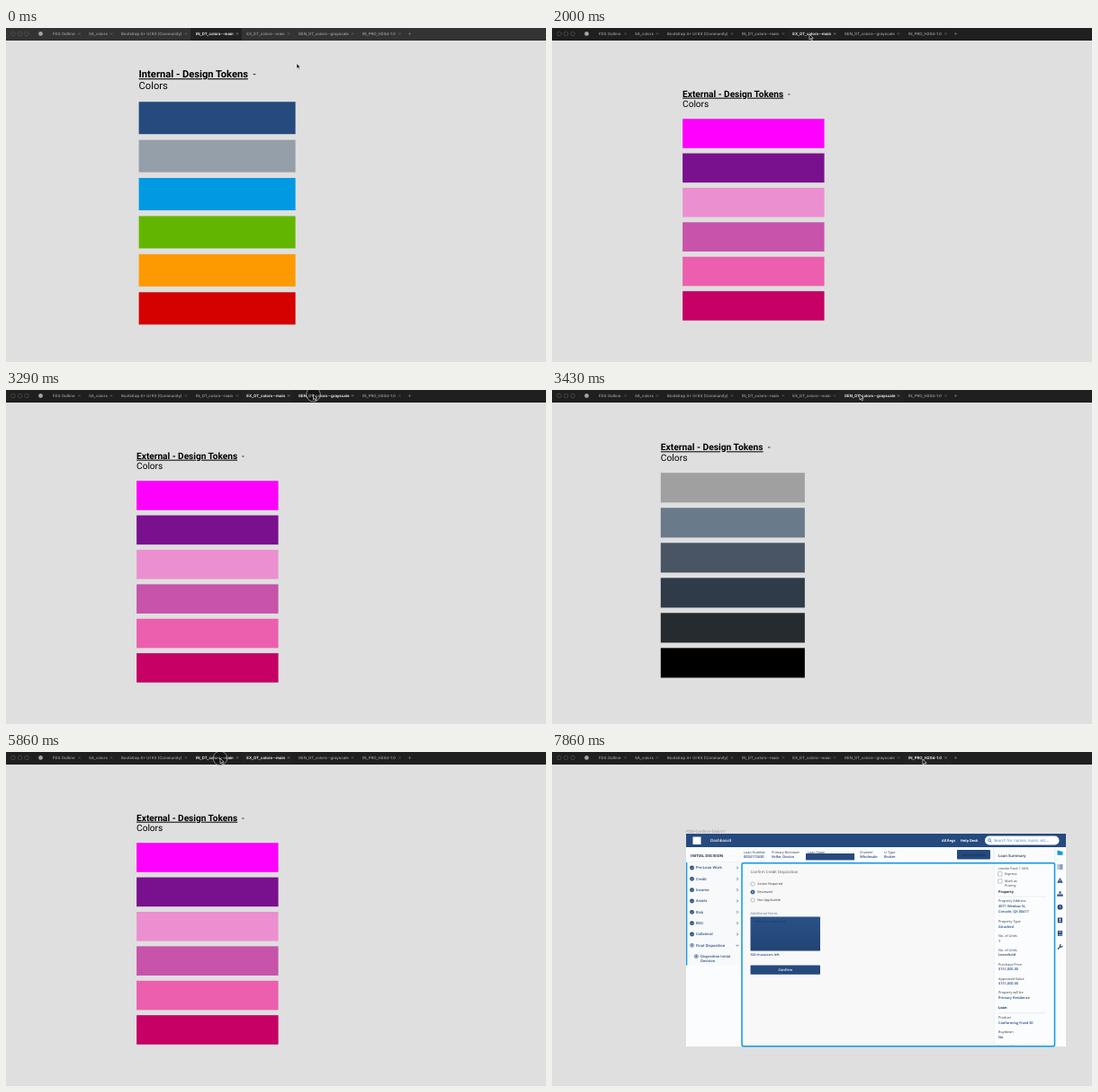
An HTML page for the animation above (8000 ms loop, 600x372 px).

```html
<!DOCTYPE html>
<html lang="en">
<head>
<meta charset="utf-8">
<title>Design tokens</title>
<style>
  html, body { margin: 0; width: 100%; height: 100%; overflow: hidden; background: #dfdfdf; }
  svg { display: block; width: 100vw; height: 100vh; }
  text { white-space: pre; text-rendering: geometricPrecision; }
  .tab { font: 500 4.35px Inter, sans-serif; fill: #a5a5a5; }
  .tab.lit { font-weight: 600; fill: #fff; }
  .title { font: 11.15px Roboto, sans-serif; fill: #000; }
  .title .name { font-weight: 700; text-decoration: underline; }
  .app text { font-family: "Open Sans", sans-serif; }
</style>
</head>
<body>
<svg id="stage" viewBox="0 0 600 372" preserveAspectRatio="none"></svg>
<script>
const stage = document.getElementById('stage');
const NAVY = '#254a7d', BRIGHT = '#0d99e6', INK = '#333d4a';

function add(parent, tag, attrs = {}, content) {
  const el = document.createElementNS('http://www.w3.org/2000/svg', tag);
  for (const key in attrs) el.setAttribute(key, attrs[key]);
  if (content !== undefined) el.textContent = content;
  parent.append(el);
  return el;
}
const rect = (p, x, y, width, height, fill, more) => add(p, 'rect', { x, y, width, height, fill, ...more });
const circle = (p, cx, cy, r, fill, more) => add(p, 'circle', { cx, cy, r, fill, ...more });
const line = (p, d, stroke, width = 0.6, more) =>
  add(p, 'path', { d, stroke, 'stroke-width': width, fill: 'none', ...more });
const label = (p, x, y, str, size = 3.9, fill = INK, weight = 400, more) =>
  add(p, 'text', { x, y, 'font-size': size, fill, 'font-weight': weight, ...more }, str);

rect(stage, 0, 0, 600, 372, '#dfdfdf');

// Colour boards share one layout and differ in place and scale.
function board(name, x, y, scale, colors) {
  const g = add(stage, 'g', { transform: `translate(${x} ${y}) scale(${scale})` });
  const title = add(g, 'text', { class: 'title', x: 0, y: -27 });
  add(title, 'tspan', { class: 'name' }, name + ' - Design Tokens');
  add(title, 'tspan', {}, '\u00a0\u00a0-');
  add(g, 'text', { class: 'title', x: 0, y: -14.2 }, 'Colors');
  colors.forEach((c, i) => rect(g, 0, i * 42.42, 174, 36, c));
  return g;
}

function projectScreen() {
  const g = add(stage, 'g', { class: 'app' });
  label(g, 149, 89.6, 'PDD-Confirm-Task V1', 4.4, '#8f8f8f');
  rect(g, 149, 91, 422, 237, '#fbfcfd');
  header(g);
  summaryRow(g);
  sideNav(g);
  form(g);
  loanDetails(g);
  toolIcons(g);
  rect(g, 211, 123.8, 347.5, 204, 'none', { stroke: BRIGHT, 'stroke-width': 1.5, rx: 1.5 });
  return g;
}

function header(g) {
  rect(g, 149, 91, 422, 15, NAVY);
  rect(g, 156.5, 94.5, 9, 8.5, '#fff');
  label(g, 176, 100.4, 'Dashboard', 4.4, '#fff', 600);
  label(g, 433, 100.4, 'All Regs', 3.9, '#fff', 700);
  label(g, 454, 100.4, 'Help Desk', 3.9, '#fff', 700);
  rect(g, 481, 93.6, 82.5, 9.8, '#fff', { rx: 4.9 });
  circle(g, 486, 98.1, 1.5, 'none', { stroke: '#2f6fb0', 'stroke-width': 0.7 });
  line(g, 'M487 99.2l1.5 1.5', '#2f6fb0', 0.8);
  label(g, 490.7, 100.2, 'Search for names, loans, etc...', 4.45, '#4a7fb5');
}

function summaryRow(g) {
  label(g, 154, 116.6, 'INITIAL DECISION', 4.2, '#263545', 700);
  [['Loan Number', '0004172630', 213], ['Primary Borrower', 'Velke, Dorian', 244],
   ['Loan Stage', '', 284], ['Channel', 'Wholesale', 342], ['LI Type', 'Broker', 369]
  ].forEach(([name, value, x]) => {
    label(g, x, 112.6, name, 3.75);
    label(g, x, 118.4, value, 3.95, NAVY, 600);
  });
  rect(g, 282, 113, 54, 7.4, NAVY);
  rect(g, 450, 109, 37, 10.4, NAVY, { rx: 1 });
  label(g, 468.5, 115.8, 'Start Decision', 3.9, '#16315a', 600, { 'text-anchor': 'middle' });
  label(g, 496, 116.6, 'Loan Summary', 4.2, '#263545', 600);
  line(g, 'M149 123H558M491 106V328', '#d9dfe6', 0.6);
}

function sideNav(g) {
  rect(g, 149, 123, 61.5, 114.5, '#f7f9fa');
  rect(g, 149, 123, 1.3, 114.5, BRIGHT);
  const items = ['Pre-Loan Work', 'Credit', 'Income', 'Assets', 'Risk', 'REO', 'Collateral', 'Final Disposition'];
  items.forEach((name, i) => {
    const y = 129 + i * 12.33, last = i === items.length - 1;
    if (last) {
      openDot(g, 155.5, y);
    } else {
      circle(g, 155.5, y, 2.4, NAVY);
      line(g, `M154.4 ${y}l.8.9l1.5-1.7`, '#fff', 0.5);
    }
    label(g, 160, y + 1.4, name, 4.05, NAVY, 600);
    line(g, last ? `M204.6 ${y - 0.6}l1.4 1.4l1.4-1.4` : `M205.3 ${y - 1.4}l1.4 1.4l-1.4 1.4`, NAVY, 0.7);
  });
  openDot(g, 160.3, 227.6);
  label(g, 165, 229, 'Disposition Initial', 3.95, NAVY, 600);
  label(g, 165, 234.3, 'Decision', 3.95, NAVY, 600);
}

function openDot(g, x, y) {
  circle(g, x, y, 2, '#fff', { stroke: NAVY, 'stroke-width': 0.6 });
  circle(g, x, y, 1, NAVY);
}

function form(g) {
  const shade = add(add(stage, 'defs'), 'linearGradient', { id: 'shade', x2: 0, y2: 1 });
  add(shade, 'stop', { offset: 0, 'stop-color': '#2a5187' });
  add(shade, 'stop', { offset: 1, 'stop-color': '#214472' });
  rect(g, 211, 123.8, 279.7, 204, '#f8f8f8');
  label(g, 220.5, 135.4, 'Confirm Credit Disposition', 4.3, '#4d5661');
  ['Action Required', 'Reviewed', 'Not Applicable'].forEach((name, i) => {
    const y = 147 + i * 9, on = i === 1;
    circle(g, 223, y, 2.1, on ? NAVY : '#fff', { stroke: on ? NAVY : '#8795a5', 'stroke-width': 0.6 });
    if (on) circle(g, 223, y, 0.8, '#fff');
    label(g, 228.3, y + 1.4, name, 3.75);
  });
  label(g, 220.5, 181, 'Additional Notes', 3.9, '#5878a4');
  rect(g, 220.5, 183.5, 77.5, 38, 'url(#shade)', { rx: 0.8 });
  label(g, 224, 190, 'Add your notes here', 3.8, '#1c3a66');
  label(g, 220.5, 227, '500 characters left', 3.6, NAVY, 600);
  rect(g, 220.5, 237.5, 77.5, 10.3, NAVY, { rx: 0.8 });
  label(g, 259.2, 244.2, 'Confirm', 4, '#fff', 600, { 'text-anchor': 'middle' });
}

function loanDetails(g) {
  const clip = add(add(stage, 'defs'), 'clipPath', { id: 'panel' });
  rect(clip, 491, 106, 67, 221.5);
  const p = add(g, 'g', { 'clip-path': 'url(#panel)' });
  label(p, 496, 130.5, 'Lender Paid: 1.50%', 3.75);
  for (const y of [133.8, 141.8]) rect(p, 495.8, y, 4.2, 4.2, '#fff', { stroke: '#8795a5', 'stroke-width': 0.5 });
  label(p, 503, 137.3, 'Express', 3.75);
  label(p, 503, 145.3, 'Mark as', 3.75);
  label(p, 503, 150, 'Priority', 3.75);
  label(p, 496, 156.6, 'Property', 3.9, '#263545', 700);
  label(p, 496, 286.4, 'Loan', 3.9, '#263545', 700);
  line(p, 'M496 161H549M496 290.8H549', '#d3dae2', 0.5);
  [[167.4, 'Property Address', '4071 Wenlow St,', 'Corvale, QX 00417'],
   [190, 'Property Type', 'Attached'], [206.2, 'No. of Units', '1'], [221.8, 'No. of Units', 'Leasehold'],
   [237.6, 'Purchase Price', '$151,000.00'], [253.5, 'Appraised Value', '$151,000.00'],
   [269.3, 'Property will be', 'Primary Residence'], [297.4, 'Product', 'Conforming Fixed 30'],
   [313.2, 'Buydown', 'No'], [329.2, 'Impounds']
  ].forEach(([y, name, ...values]) => {
    label(p, 496, y, name, 3.8);
    values.forEach((v, i) => label(p, 496, y + 5.6 * (i + 1), v, 3.9, NAVY, 600));
  });
}

function toolIcons(g) {
  line(g, 'M558.8 106V328', '#d9dfe6', 0.6);
  const icon = (y, d, fill = NAVY) => add(g, 'path', { d, fill, transform: `translate(564.5 ${y})` });
  const stroke = (y, d, color, width) => line(g, d, color, width, { transform: `translate(564.5 ${y})` });
  icon(112.3, 'M-3-2.5h2.5l1 1H3V2.5H-3z', BRIGHT);
  stroke(128, 'M-3-2H-1.8M-3 0H-1.8M-3 2H-1.8M-1-2H3M-1 0H3M-1 2H3', NAVY, 1);
  icon(143, 'M0-3L3.2 2.7H-3.2z');
  stroke(143, 'M0-1V1M0 1.5v.6', '#fff', 0.6);
  icon(158, 'M-1-2.8h2v2h-2zM-3.2.8h2v2h-2zM-1 .8h2v2h-2zM1.2.8h2v2h-2z');
  stroke(158, 'M0-1V1M-2.2 1V0H2.2V1', NAVY, 0.5);
  circle(g, 564.5, 172.7, 2.9, NAVY);
  stroke(172.7, 'M0-1.8V0L1.2.9', '#fff', 0.6);
  icon(187.4, 'M-2.6-2.9h5.2v5.8h-5.2z');
  circle(g, 564.5, 186.5, 0.9, '#fff');
  icon(187.4, 'M-1.5 1.7q1.5-2.2 3 0z', '#fff');
  icon(202, 'M-2.6-2.9h5.2v5.8h-5.2z');
  stroke(202, 'M-1.4-1.3H1.6M-1.6 1.7H2.6', '#fff', 0.6);
  stroke(217, 'M-2.6 2.6L1 -1', NAVY, 1.3);
  stroke(217, 'M1-2.8A1.5 1.5 0 1 0 2.8-1', NAVY, 1.1);
}

const pages = {
  internal: board('Internal', 147.6, 82.2, 1,
    ['#254a7d', '#959fa9', '#0099e2', '#63b600', '#fe9a01', '#d50000']),
  external: board('External', 145.1, 101.2, 0.905,
    ['#ff00ff', '#79108e', '#ec8fd0', '#c753ab', '#ec5fae', '#c60064']),
  grayscale: board('External', 120.8, 92.2, 0.92,
    ['#a0a0a0', '#697a8b', '#495565', '#2f3b48', '#252b2e', '#000']),
  project: projectScreen()
};

// Tab bar: text, text start, left edge, close mark, page opened by the tab.
const BAR_HEIGHT = 14;
const bar = rect(stage, 0, 0, 600, BAR_HEIGHT, '#1f1f1f');
const activeBack = rect(stage, 0, 0, 0, BAR_HEIGHT, '#222');
for (const x of [8, 15.5, 23]) circle(stage, x, 6.4, 2.3, 'none', { stroke: '#5c5c5c', 'stroke-width': 0.6 });
circle(stage, 38.5, 6.4, 2.4, '#a5a5a5');
const tabs = [
  ['FDS Outline', 52, 46, 81.5], ['SA_colors', 92, 86, 117],
  ['Bootstrap 4+ UI Kit (Community)', 128, 122, 200],
  ['IN_DT_colors--main', 211, 205, 257, 'internal'],
  ['EX_DT_colors--main', 267.3, 262, 314, 'external'],
  ['GEN_DT_colors--grayscale', 324.8, 318.5, 385, 'grayscale'],
  ['IN_PRO_H20d-1.0', 396, 390, 437.5, 'project']
].map(([name, x, left, close, page], i, all) => ({
  left, page,
  right: all[i + 1] ? all[i + 1][2] : 443,
  text: add(stage, 'text', { class: 'tab', x, y: 8 }, name),
  close: line(stage, `M${close - 1.1} 5.3l2.2 2.2m0-2.2l-2.2 2.2`, '#777', 0.5)
}));
line(stage, 'M446.9 6.4h3.2M448.5 4.8v3.2', '#888', 0.5);

const ring = circle(stage, 0, 0, 7.8, '#000', { 'fill-opacity': 0.3, stroke: '#b4b4b4', 'stroke-width': 0.7 });
const pointer = add(stage, 'path', {
  d: 'M0 0V5.9L1.4 4.6L2.4 6.8L3.4 6.3L2.4 4.2H4.2Z',
  fill: '#000', stroke: '#fff', 'stroke-width': 0.6, 'stroke-linejoin': 'round'
});

const LOOP = 8000, RATE = 7 / 1000, FOCUS = 2;
const path = [
  [0, 323, 39.5], [8, 297, 9], [9, 297, 9], [11, 285, 7], [14, 286, 7], [16, 286, 7],
  [22, 341, 5], [24, 342, 5], [26, 342, 5], [29, 328, 5], [30, 328, 5], [35, 292, 8],
  [38, 290, 7], [41, 238, 7], [42, 238, 7], [45, 316.5, 6.5], [47, 316.5, 6.5],
  [48, 317.5, 6.5], [53, 411, 8], [55, 412, 8]
];
const shows = [[0, 'internal'], [13, 'external'], [24, 'grayscale'], [36, 'external'], [42, 'internal'], [54, 'project']];
const clicks = [12, 23, 35, 41];

function pointerAt(step) {
  const next = path.findIndex(k => k[0] >= step);
  if (next === 0) return path[0].slice(1);
  const [t0, x0, y0] = path[next - 1], [t1, x1, y1] = path[next];
  const u = (step - t0) / (t1 - t0), e = u * u * (3 - 2 * u);
  return [x0 + (x1 - x0) * e, y0 + (y1 - y0) * e];
}

function draw(time) {
  const step = Math.min(55, Math.floor((time % LOOP + 2) * RATE));
  const [x, y] = pointerAt(step);
  const current = shows.filter(s => s[0] <= step).pop()[1];
  for (const name in pages) pages[name].style.display = name === current ? '' : 'none';
  bar.setAttribute('fill', step < FOCUS ? '#333' : '#1f1f1f');
  for (const tab of tabs) {
    const active = tab.page === current;
    const lit = active || (y < BAR_HEIGHT && x >= tab.left && x < tab.right);
    tab.text.classList.toggle('lit', lit);
    tab.close.setAttribute('stroke', lit ? '#aaa' : '#777');
    if (active) {
      activeBack.setAttribute('x', tab.left);
      activeBack.setAttribute('width', tab.right - tab.left);
    }
  }
  pointer.setAttribute('transform', `translate(${x} ${y})`);
  ring.setAttribute('cx', x);
  ring.setAttribute('cy', y);
  ring.style.display = clicks.includes(step) ? '' : 'none';
}

const start = performance.now();
function tick() {
  draw(performance.now() - start);
  requestAnimationFrame(tick);
}
tick();
</script>
</body>
</html>
```
